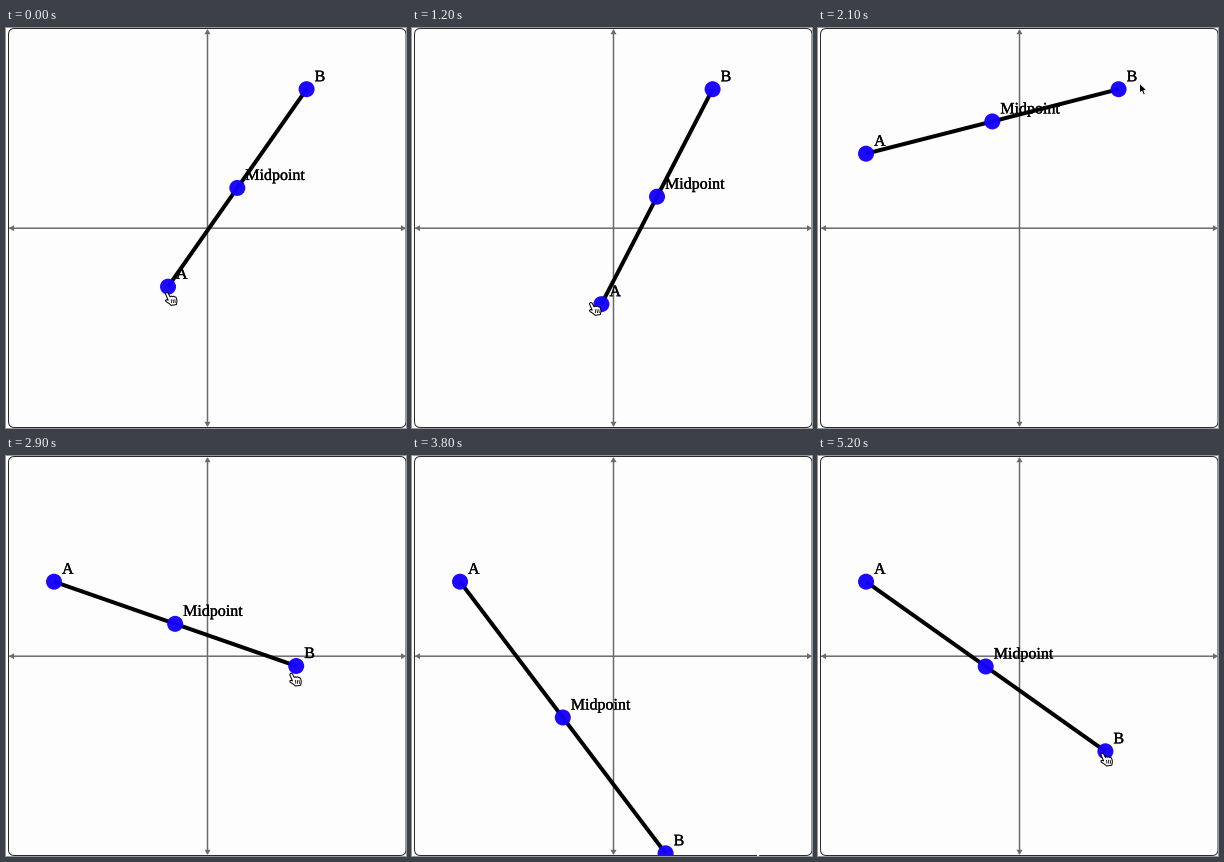
Animation, 400 px wide and 400 px high, one loop 5.3 s. Source, as a matplotlib script:

```python
import matplotlib.pyplot as plt
import numpy as np
from matplotlib.animation import FuncAnimation
from matplotlib.patches import Circle, FancyBboxPatch, Polygon, Rectangle
from matplotlib.patheffects import withStroke

SIZE, DPI = 400, 100
PX = 72 / DPI  # points per pixel
FRAMES, INTERVAL = 53, 100
GRAY = "#6a6a6a"

A_CENTER, A_RADII = np.array([142, 195]), np.array([76, 88])
B_START, B_LOW, B_END = (300.6, 61.2), (253.6, 397.3), (287.4, 295.3)
ASIDE = (321.5, 55)
LEAD = 0.15  # how far the pointer runs ahead of a dragged point
B_GRAB = np.array([-3, 1.5])
SLIP = 15  # moment at which the pointer slips off A

HAND = np.array([(-1.6, 1.6), (-0.4, 0.2), (1, 0.8), (3, 4.6), (4.2, 3.9),
                 (5.4, 4.4), (6.6, 4), (7.7, 4.8), (8.8, 4.9), (9.6, 6.6),
                 (10, 9), (9.4, 12.4), (4.2, 13.2), (2.4, 11.6), (-1, 9.4),
                 (-1.6, 8.1), (-0.2, 7.5), (1.2, 8.1)])
ARROW = np.array([(0, 0), (0, 10.2), (2.3, 8.2), (4, 12), (5.9, 11.2),
                  (4.3, 7.5), (7.4, 7.3)])
CREASES = np.array([p for x in (4.2, 6, 7.8)
                    for p in ((x, 7.5), (x + 0.4, 10.5), (np.nan, np.nan))])


def path(f, *keys):
    """Smooth curve through keys (frame, x, y), at rest at both ends."""
    keys = np.array(keys, float)
    t, p = keys[:, 0], keys[:, 1:]
    slope = np.gradient(p, t, axis=0)
    slope[0] = slope[-1] = 0
    f = np.clip(f, t[0], t[-1])
    i = min(np.searchsorted(t, f, "right") - 1, len(t) - 2)
    h = t[i + 1] - t[i]
    u = (f - t[i]) / h
    ease = u * u * (3 - 2 * u)
    return (p[i] * (1 - ease) + p[i + 1] * ease
            + h * u * (1 - u) * (slope[i] * (1 - u) - slope[i + 1] * u))


def point_a(f):
    """Widening spiral, keyed by turn in degrees and scale."""
    turn, scale = path(f, (2, 70, 0.77), (8, 265.6, 0.972),
                       (15, 508, 1.225), (21, 572.5, 1.466))
    turn = np.radians(turn)
    return A_CENTER + A_RADII * scale * (np.cos(turn), np.sin(turn))


def point_b(f):
    if f < 40:
        return path(f, (26, *B_START), (29, 290.2, 210), (32, 250, 305),
                    (35, *B_LOW))
    return path(f, (44, *B_LOW), (49, 263, 291), (52, *B_END))


def drag(point, f):
    return point(f) + LEAD * (point(f + 1) - point(f))


def pointer(f):
    """Tip of the pointer and whether it is an arrow, or None off stage."""
    if f <= 18:
        return drag(point_a, f) + path(f, (2, -1, 5.5), (12, -3, -5)), f == SLIP
    if 26 <= f < 35 or f >= 44:
        return drag(point_b, f) + B_GRAB, False
    if 35 <= f < 38:
        return None
    if f <= 21:
        tip = path(f, (18, 45, 128), (21, *ASIDE))
    elif f < 26:
        tip = path(f, (21, *ASIDE), (26, *(B_START + B_GRAB)))
    else:
        tip = path(f, (38, 345.5, 398.7), (41, 315, 345),
                   (44, *(B_LOW + B_GRAB)))
    return tip, np.hypot(*(tip - point_b(f))) > 8


fig = plt.figure(figsize=(SIZE / DPI, SIZE / DPI), dpi=DPI, facecolor="white")
ax = fig.add_axes([0, 0, 1, 1])
ax.set(xlim=(0, SIZE), ylim=(SIZE, 0))
ax.axis("off")

ax.add_patch(FancyBboxPatch((2.5, 0.5), 397.5, 399,
                            boxstyle="round,pad=0,rounding_size=6",
                            fc="#fdfdfd", ec="#2b2b2b", lw=PX))

# Axes with arrowheads
ax.plot([201.5, 201.5], [3, 397], color=GRAY, lw=1.5 * PX, snap=False)
ax.plot([4, 398], [200.2, 200.2], color=GRAY, lw=1.5 * PX, snap=False)
for tip, along in (((201.5, 1.2), (0, 1)), ((201.5, 398.8), (0, -1)),
                   ((3, 200.2), (1, 0)), ((400, 200.2), (-1, 0))):
    tip, along = np.array(tip), np.array(along)
    side = along[::-1] * 3
    base = tip + along * 5
    ax.add_patch(Polygon([tip, base + side, base - side], fc=GRAY, lw=0))

inside = Rectangle((3, 1), 397, 398, transform=ax.transData)
segment, = ax.plot([], [], color="black", lw=4 * PX, zorder=3,
                   solid_capstyle="butt")
segment.set_clip_path(inside)

dots, labels = [], []
for name in ("A", "B", "Midpoint"):
    dot = ax.add_patch(Circle((0, 0), 8, fc="#1400ff", lw=0, alpha=0.96,
                              zorder=4))
    dot.set_clip_path(inside)
    dots.append(dot)
    labels.append(ax.text(0, 0, name, family="Liberation Serif",
                          size=16 * PX, va="baseline", zorder=5,
                          path_effects=[withStroke(linewidth=0.3 * PX,
                                                   foreground="black")]))

hand = ax.add_patch(Polygon(HAND, fc="white", ec="black", lw=PX,
                            joinstyle="round", zorder=6))
creases, = ax.plot([], [], color="black", lw=0.8 * PX, zorder=7)
arrow = ax.add_patch(Polygon(ARROW, fc="black", ec="white", lw=PX, zorder=6))


def draw(f):
    a, b = point_a(f), point_b(f)
    segment.set_data(*np.transpose([a, b]))
    for p, dot, label in zip((a, b, (a + b) / 2), dots, labels):
        dot.center = p
        label.set_position(p + (8, -8))

    for part in (hand, creases, arrow):
        part.set_visible(False)
    state = pointer(f)
    if state:
        tip, is_arrow = state
        arrow.set_xy(ARROW + tip)
        hand.set_xy(HAND + tip)
        creases.set_data(*(CREASES + tip).T)
        for part in (arrow,) if is_arrow else (hand, creases):
            part.set_visible(True)
    return [segment, *dots, *labels, hand, creases, arrow]


anim = FuncAnimation(fig, draw, frames=FRAMES, interval=INTERVAL,
                     repeat=True, repeat_delay=0, blit=False)
plt.show()
```
